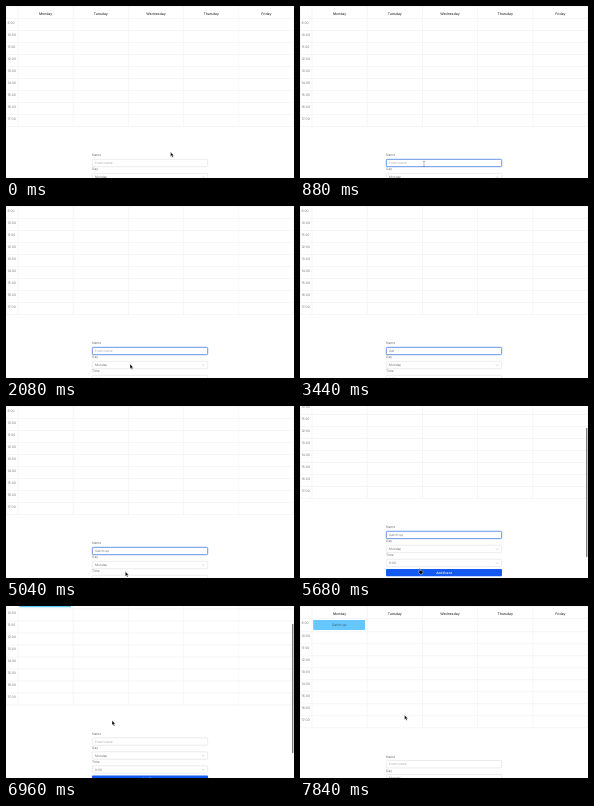
Animation of 288x172 px, one loop 8 s. Source, as an HTML page:

```html
<!DOCTYPE html>
<html lang="en">
<head>
<meta charset="utf-8">
<title>Weekly planner</title>
<style>
html, body { margin: 0; width: 100%; height: 100%; overflow: hidden; background: #fff; }
svg { display: block; width: 288px; height: 172px; }
text { font-family: Inter, Roboto, sans-serif; font-size: 3.3px; fill: #707070; text-rendering: geometricPrecision; }
.mid { text-anchor: middle; }
.day { fill: #333; font-size: 3.45px; font-weight: 500; }
.value { font-size: 3.2px; }
.action { fill: #fff; font-size: 3.15px; font-weight: 600; }
.event { fill: #3c5a6c; }
.grid { stroke: #f0f0f0; stroke-width: 0.6; }
.ink { fill: #000; stroke: #fff; stroke-width: 0.4; stroke-linejoin: round; }
.beam { fill: none; stroke: #777; stroke-width: 0.5; }
.chevron { fill: none; stroke: #aaa; stroke-width: 0.5; }
</style>
</head>
<body>
<svg id="stage" viewBox="0 0 288 172" xmlns="http://www.w3.org/2000/svg"></svg>
<script>
const LOOP = 8000;
const stage = document.getElementById('stage');

function set(el, attrs) {
  for (const k in attrs) el.setAttribute(k, attrs[k]);
}
function add(parent, tag, attrs = {}, text = '') {
  const el = document.createElementNS('http://www.w3.org/2000/svg', tag);
  set(el, attrs);
  if (text) el.textContent = text;
  return parent.appendChild(el);
}
const show = (el, on) => el.setAttribute('visibility', on ? 'visible' : 'hidden');
const mix = (a, b, p) => `rgb(${a.map((v, i) => Math.round(v + (b[i] - v) * p))})`;

// Eased progress from 0 to 1, and a fade in then out
function ramp(t, from, length) {
  const p = Math.max(0, Math.min(1, (t - from) / length));
  return p * p * (3 - 2 * p);
}
const pulse = (t, from, to, fadeIn, fadeOut) =>
  ramp(t, from, fadeIn) - ramp(t, to - fadeOut, fadeOut);

// Calendar
const LEFT = 12, HEAD = 12.5, COL = 55.2, ROW = 12, BOTTOM = HEAD + 9 * ROW;
const page = add(stage, 'g');
const line = (parent, x1, y1, x2, y2) => add(parent, 'line', { class: 'grid', x1, y1, x2, y2 });

line(page, 0, 0.3, 288, 0.3);
line(page, 0, HEAD, 288, HEAD);
const columns = [0.3];
['Monday', 'Tuesday', 'Wednesday', 'Thursday', 'Friday'].forEach((day, i) => {
  columns.push(LEFT + COL * i);
  add(page, 'text', { class: 'mid day', x: LEFT + COL * (i + 0.5), y: 9.2 }, day);
});
columns.push(287.7);
const verticals = columns.map(x => line(page, x, 0, x, BOTTOM));
add(page, 'text', { x: 1.5, y: HEAD + 5.1 }, '9:00');

const entry = add(page, 'g');
add(entry, 'rect', { x: 13.2, y: 14, width: 51.8, height: 10, rx: 0.4, fill: '#66c7fc' });
add(entry, 'text', { class: 'mid event', x: 39.2, y: 20.1 }, 'Catch-up');

// Everything pushed down when the first row grows
const rest = add(page, 'g');
for (let i = 1; i <= 9; i++) {
  const y = HEAD + ROW * i;
  line(rest, 0, y, 288, y);
  if (i < 9) add(rest, 'text', { x: 1.5, y: y + 5.1 }, `${9 + i}:00`);
}

// Form
const BORDER = [224, 224, 224], ACTIVE = [100, 150, 232];

function field(label, top, value, select) {
  add(rest, 'text', { x: 86, y: top - 2.6, fill: '#555' }, label);
  const box = add(rest, 'rect', { x: 86.3, y: top + 0.3, width: 115.4, height: 7.4, rx: 0.9,
    fill: '#fff', stroke: mix(BORDER, BORDER, 0), 'stroke-width': 0.6 });
  const text = add(rest, 'text', { class: 'value', x: 89, y: top + 5.2 }, value);
  if (select) add(rest, 'path', { class: 'chevron', d: `M196 ${top + 3.5}l1.2 1.2l1.2 -1.2` });
  return { box, text };
}
const nameField = field('Name', 153, 'Event name');
field('Day', 167, 'Monday', true);
field('Time', 181, '9:00', true);
const button = add(rest, 'rect', { x: 86, y: 191, width: 116, height: 7.2, rx: 0.8 });
add(rest, 'text', { class: 'mid action', x: 144, y: 195.8 }, 'Add Event');

// Overlays
const bar = add(stage, 'rect', { x: 286, width: 1.4, height: 129.5, rx: 0.7, fill: '#808080' });
const ring = add(stage, 'circle', { fill: '#888', 'fill-opacity': 0.06, stroke: '#555', 'stroke-width': 0.6 });
const cursor = add(stage, 'g');
const shapes = {
  arrow: add(cursor, 'path', { class: 'ink', d: 'M0 0V4.7L1.1 3.7L1.9 5.5L2.8 5.1L2 3.4H3.4Z' }),
  beam: add(cursor, 'path', { class: 'beam', d: 'M-1 -2.6H1M0 -2.6V2.6M-1 2.6H1' }),
  hand: add(cursor, 'path', { class: 'ink', d: 'M0 .4Q.5 -.3 1 .4V2.1L3.2 2.7Q3.8 3 3.6 3.9L3.1 5.6H.6L-1 3.6Q-1 2.8 0 3.3Z' })
};

// Story
const WORD = 'Catch-up', ADDED = 6480;
const HOME = { x: 164.5, y: 146 };
const MOVES = [
  { at: 40, length: 270, x: 124, y: 158 },
  { at: 4760, length: 280, x: 119.3, y: 165.6 },
  { at: 5280, length: 420, x: 119.3, y: 162.4 },
  { at: 6640, length: 400, x: 104.5, y: 109 }
];
const CLICKS = [{ at: 470, x: 124, y: 154 }, { at: 6160, x: 118.8, y: 162 }];

// Typed in two bursts with a pause between
const keyTime = i => (i < 3 ? 2480 : 2920) + 200 * i;

function typedText(t) {
  if (t >= ADDED) return '';
  return [...WORD].filter((c, i) => t >= keyTime(i)).join('');
}

function pickShape(t) {
  if (t >= 2480 && t < 4800) return null;
  if (t >= 240 && t < 1520) return 'beam';
  if (t >= 5680 && t < 6720) return 'hand';
  return 'arrow';
}

function drawCursor(t) {
  let { x, y } = HOME;
  for (const m of MOVES) {
    const p = ramp(t, m.at, m.length);
    x += (m.x - x) * p;
    y += (m.y - y) * p;
  }
  set(cursor, { transform: `translate(${x} ${y})` });
  const shape = pickShape(t);
  for (const k in shapes) show(shapes[k], k === shape);
}

function drawRing(t) {
  const click = CLICKS.find(c => t > c.at && t < c.at + 400);
  show(ring, click);
  if (!click) return;
  set(ring, { cx: click.x, cy: click.y, r: 3.5 + 5.5 * ramp(t, click.at, 140),
    opacity: 1 - ramp(t, click.at + 200, 200) });
}

function draw(t) {
  const scroll = 12 * ramp(t, 1000, 270) + 18 * ramp(t, 5220, 580) - 30 * ramp(t, 6640, 1000);
  const added = t >= ADDED, grow = added ? 1.2 : 0;
  set(page, { transform: `translate(0 ${-scroll})` });
  set(rest, { transform: `translate(0 ${grow})` });
  verticals.forEach(v => set(v, { y2: BOTTOM + grow }));
  show(entry, added);

  const typed = typedText(t);
  nameField.text.textContent = typed || 'Event name';
  nameField.text.style.fill = typed ? '#777' : '#aaa';
  const focus = pulse(t, 460, 6640, 340, 240);
  set(nameField.box, { stroke: mix(BORDER, ACTIVE, focus), 'stroke-width': 0.6 + 0.4 * focus });
  set(button, { fill: mix([21, 90, 240], [10, 76, 202], pulse(t, 5680, 6860, 160, 160)) });

  const shown = pulse(t, 1000, 2080, 80, 280) + pulse(t, 5220, 6120, 80, 280) + pulse(t, 6620, 7830, 80, 280);
  set(bar, { y: 0.6 + scroll * 0.755, opacity: shown });
  drawRing(t);
  drawCursor(t);
}

const start = performance.now();
function tick() {
  draw((performance.now() - start) % LOOP);
  requestAnimationFrame(tick);
}
tick();
</script>
</body>
</html>
```
